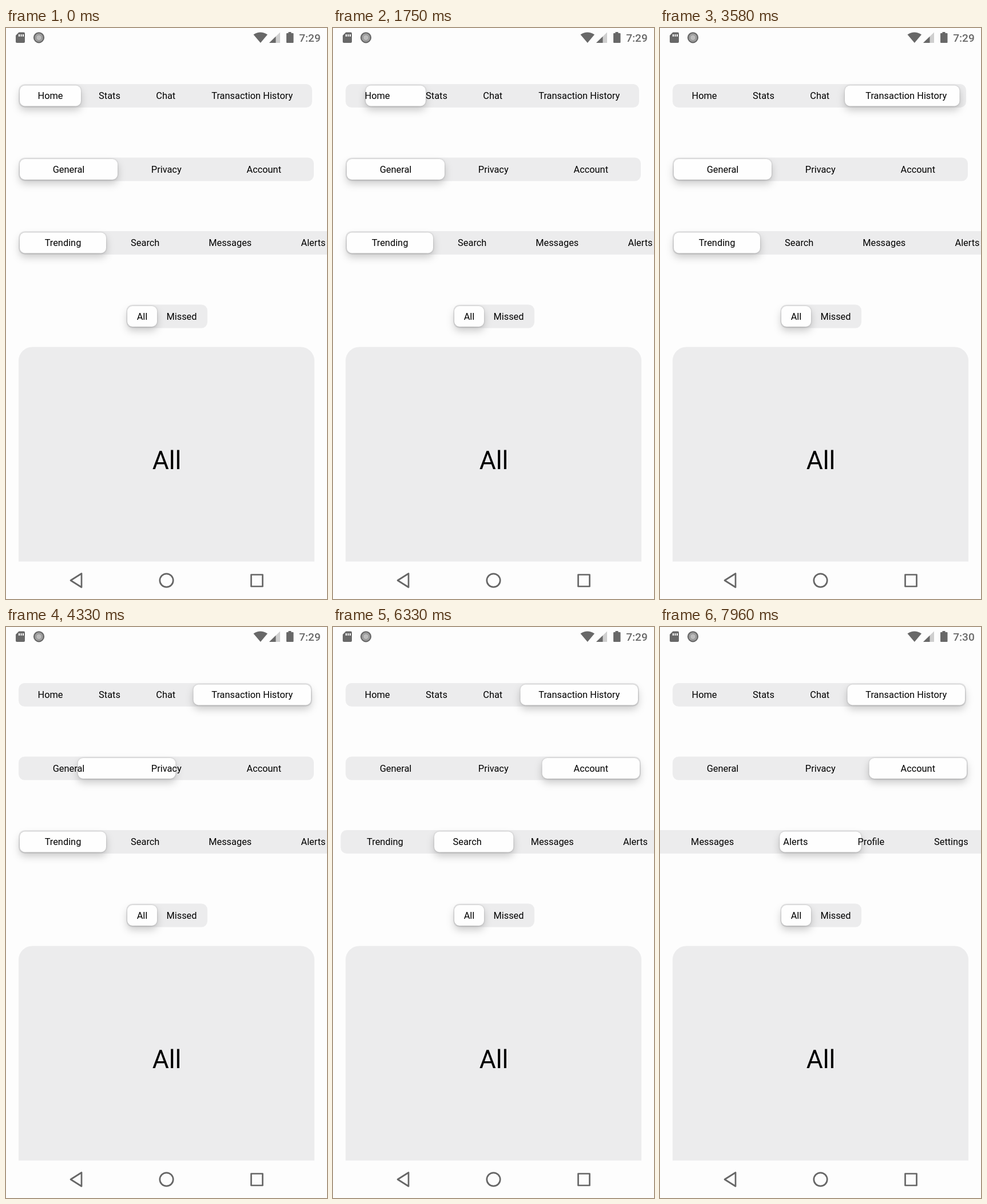
Write an HTML page that moves like this. It is 561x998 px and loops after 8 s.

```html
<!DOCTYPE html>
<html lang="en">
<head>
<meta charset="utf-8">
<title>Segmented controls</title>
<style>
  html, body { margin: 0; width: 100%; height: 100%; overflow: hidden; background: #fdfdfd; }
  svg { display: block; width: 100%; height: 100%; }
  text { font-family: Roboto, sans-serif; text-anchor: middle; }
  .tab { font-size: 16.36px; }
  .bar, .panel { fill: #ececed; }
  .pill {
    fill: #fefefe;
    filter: drop-shadow(0 0 1.5px rgba(0, 0, 0, .22)) drop-shadow(0 7px 7px rgba(0, 0, 0, .2));
  }
  .status { fill: #686868; }
  .nav { fill: none; stroke: #666; stroke-width: 2.7; stroke-linejoin: round; }
</style>
</head>
<body>
<svg viewBox="0 0 561 998">
  <rect width="561" height="998" fill="#fdfdfd"/>

  <g class="status">
    <path fill-rule="evenodd" d="M22.5 7.5H31q2 0 2 2V24q0 2-2 2H19q-2 0-2-2V13ZM22 11v4h2v-4ZM25.5 11v4h2v-4ZM29 11v4h2v-4Z"/>
    <circle cx="57.5" cy="16.8" r="8.4" fill="#a6a6a6" stroke="#686868" stroke-width="2.4"/>
    <circle cx="57.5" cy="16.8" r="5" fill="#bcbcbc" stroke="#858585"/>
    <path d="M432.5 11.5Q444.500 3.500 457 11.500L444.800 26Z"/>
    <path d="M479 7.500V26H460Z" fill="#cfcfcf"/>
    <path d="M471.500 14.800V26H460Z"/>
    <path d="M493.500 7h5v2h3q1 0 1 1v15q0 1-1 1h-10.500q-1 0-1-1V10q0-1 1-1h2.500Z"/>
    <text id="clock" x="531" y="23.600" font-size="19.100" font-weight="500"></text>
  </g>

  <g id="rows"></g>

  <path class="panel" d="M22 932.500V581.500a24 24 0 0 1 24-24H515a24 24 0 0 1 24 24V932.500Z"/>
  <text x="281" y="771" font-size="44.500">All</text>

  <g class="nav">
    <path d="M132 953.500V977.500L113 965.500Z"/>
    <circle cx="280.500" cy="965.500" r="11.700"/>
    <rect x="428.500" y="955.500" width="20" height="20.500"/>
  </g>
</svg>

<script>
const LOOP = 8000, SLIDE = 300, CENTER = 280.5;

// tabs: [label, width]; taps: [time, tab index]
const rows = [
  { y: 118.5, left: 24, bar: [22, 535],
    tabs: [['Home', 107], ['Stats', 100], ['Chat', 96.5], ['Transaction History', 205.5]],
    taps: [[1640, 1], [2480, 2], [3320, 3]] },
  { y: 247, left: 24, bar: [22, 538],
    tabs: [['General', 171], ['Privacy', 170.5], ['Account', 170.5]],
    taps: [[4162, 1], [4986, 2]] },
  { y: 375.5, left: 24, bar: [22, 1020], scrolls: true,
    tabs: [['Trending', 151], ['Search', 136.5], ['Messages', 160.5], ['Alerts', 130], ['Profile', 134], ['Settings', 146]],
    taps: [[5620, 1], [6280, 2], [7774, 4]] },
  { y: 504, left: 212, bar: [210.5, 352],
    tabs: [['All', 52], ['Missed', 86]],
    taps: [] }
];

const add = (parent, tag, attrs) => {
  const node = document.createElementNS('http://www.w3.org/2000/svg', tag);
  for (const key in attrs) node.setAttribute(key, attrs[key]);
  return parent.appendChild(node);
};
const mix = (a, b, k) => a + (b - a) * k;
const ease = u => u * u * (3 - 2 * u);

for (const row of rows) {
  const { y, bar: [x0, x1] } = row;
  row.group = add(document.getElementById('rows'), 'g', {});
  add(row.group, 'rect', { class: 'bar', x: x0, y: y - 20.5, width: x1 - x0, height: 41, rx: 10.5 });
  row.pill = add(row.group, 'rect', { class: 'pill', y: y - 18, height: 36, rx: 9 });
  let x = row.left;
  row.stops = row.tabs.map(([label, width]) => {
    const center = x + width / 2;
    add(row.group, 'text', { class: 'tab', x: center, y: y + 5.8 }).textContent = label;
    const stop = { x, width, scroll: row.scrolls ? Math.max(0, center - CENTER) : 0 };
    x += width;
    return stop;
  });
}

function poseAt(row, time) {
  let pose = row.stops[0];
  for (const [start, index] of row.taps) {
    if (time < start) break;
    const k = ease(Math.min(1, (time - start) / SLIDE)), goal = row.stops[index];
    pose = {
      x: mix(pose.x, goal.x, k),
      width: mix(pose.width, goal.width, k),
      scroll: mix(pose.scroll, goal.scroll, k)
    };
  }
  return pose;
}

const clock = document.getElementById('clock');

function draw() {
  const time = performance.now() % LOOP;
  for (const row of rows) {
    const { x, width, scroll } = poseAt(row, time);
    row.pill.setAttribute('x', x);
    row.pill.setAttribute('width', width);
    row.group.setAttribute('transform', `translate(${-scroll} 0)`);
  }
  clock.textContent = time < 7400 ? '7:29' : '7:30';
  requestAnimationFrame(draw);
}
draw();
</script>
</body>
</html>
```
